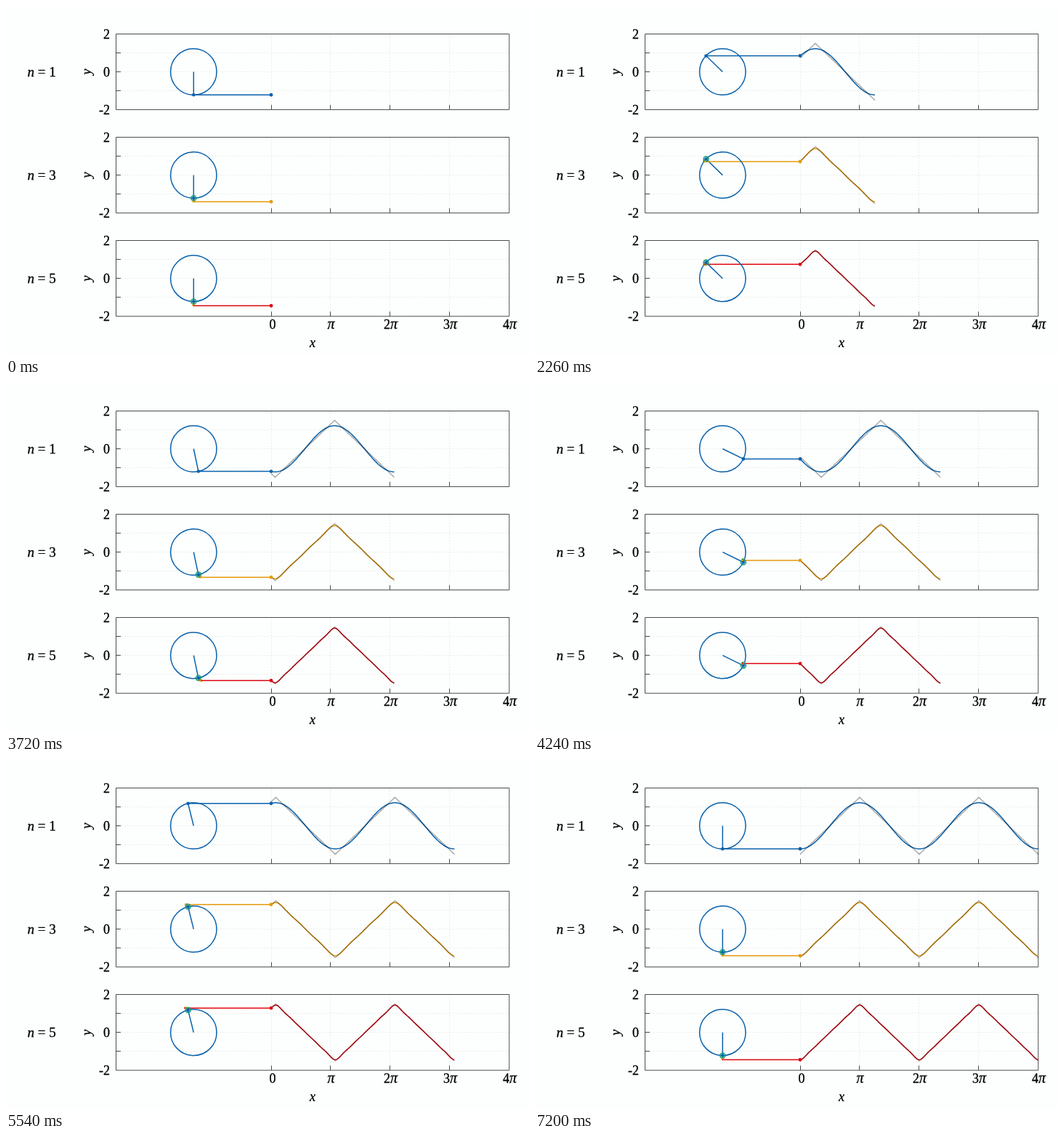
These frames come from a looping animation (720 px wide and 480 px high, 7.22 s). An HTML page:

```html
<!DOCTYPE html>
<html lang="en">
<head>
<meta charset="utf-8">
<title>Triangle wave from rotating circles</title>
<style>
  html, body { margin: 0; width: 100%; height: 100%; overflow: hidden; background: #fdfffe; }
  svg { display: block; width: 720px; height: 480px; }
  text { font: 18px "Liberation Serif", "Times New Roman", serif; fill: #000; stroke: #000; stroke-width: .3px; }
  .i { font-style: italic; }
  .pi { font-style: italic; font-size: 20px; }
  .name { font-size: 19px; }
  .mid { text-anchor: middle; }
  .end { text-anchor: end; }
  path, circle { fill: none; }
  .frame { stroke: #4a4a4a; stroke-width: 1; }
  .grid { stroke: #d3dbd8; stroke-width: 1; stroke-dasharray: 1 3; }
</style>
</head>
<body>
<svg viewBox="0 0 720 480"><g id="axes"></g><g id="motion"></g></svg>
<script>
const LEFT = 151.5, RIGHT = 692.8, ORIGIN = 365, HUB = 258.3, UNIT = 26.1;
const CENTERS = [90.5, 232.6, 374.7];
const COLORS = ['#0a62ad', '#109e78', '#e59a0c', '#e5c62c', '#e00b14'];
const AMP = 12 / Math.PI ** 2;
const STEP = 20, LOOP = 7220, SPAN = 7200;

const text = (x, y, cls, s) => `<text x="${x}" y="${y}" class="${cls}">${s}</text>`;
const path = (d, cls) => `<path class="${cls}" d="${d}"/>`;
const stroke = (d, color, extra = '') =>
  `<path d="${d}" stroke="${color}" stroke-width="1.5" stroke-linejoin="round" ${extra}/>`;
const ring = (x, y, r, color) =>
  `<circle cx="${x}" cy="${y}" r="${r}" stroke="${color}" stroke-width="1.5"/>`;
const dot = (x, y, r, color) => `<circle cx="${x}" cy="${y}" r="${r}" style="fill:${color}"/>`;

function axes() {
  let out = '';
  CENTERS.forEach((cy, i) => {
    const top = Math.floor(cy - 2 * UNIT + .1) + .5, bottom = cy + 52.1;
    let grid = '', ticks = `M${LEFT} ${top}H${RIGHT}V${bottom}H${LEFT}Z`;
    for (const v of [-1, 0, 1]) {
      const y = Math.floor(cy - v * UNIT) + .5;
      grid += `M${LEFT} ${y}H${RIGHT}`;
      ticks += `M${LEFT} ${y}h6.5`;
    }
    for (let k = 0; k < 4; k++) {
      const x = Math.floor(ORIGIN + k * Math.PI * UNIT) + .5;
      grid += `M${x} ${top}V${bottom}`;
      ticks += `M${x} ${bottom}v-6.5`;
    }
    out += path(grid, 'grid') + path(ticks, 'frame');
    for (const v of [2, 0, -2]) out += text(143, cy - v * UNIT + 6.5, 'end', v);
    out += `<text class="i mid" transform="translate(116.5 ${cy}) rotate(-90)">y</text>`;
    out += text(29.5, cy + 6, 'name', `<tspan class="i">n</tspan> = ${2 * i + 1}`);
  });
  for (let k = 0; k < 5; k++) {
    const label = k ? `${k > 1 ? k : ''}<tspan class="pi">π</tspan>` : '0';
    out += text(ORIGIN + k * Math.PI * UNIT + (k ? .5 : 2), 444, 'mid', label);
  }
  return out + text(422, 469, 'i mid', 'x');
}

// Fourier sum of the first odd harmonics
function wave(t, terms) {
  let y = 0;
  for (let n = 1; n < 2 * terms; n += 2) y -= AMP * Math.cos(n * t) / n ** 2;
  return y;
}
const triangle = t => 1.5 * (2 / Math.PI * Math.acos(Math.cos(t)) - 1);

// Newest value sits at x = 0, the first one at x = t
function trace(f, t, cy) {
  const pts = [];
  const add = u => pts.push(`${(ORIGIN + (t - u) * UNIT).toFixed(2)} ${(cy - f(u) * UNIT).toFixed(2)}`);
  for (let u = 0; u < t; u += Math.PI / 60) add(u);
  add(t);
  return 'M' + pts.join('L');
}

function panel(cy, terms, t) {
  const color = COLORS[terms - 1];
  let x = HUB, y = cy, arms = '', rings = '', joints = '';
  for (let k = 0; k < terms; k++) {
    const n = 2 * k + 1, r = AMP * UNIT / n ** 2;
    rings += ring(x, y, r, COLORS[k]);
    const from = `M${x} ${y}`;
    x += r * Math.sin(n * t);
    y += r * Math.cos(n * t);
    arms += stroke(`${from}L${x} ${y}`, COLORS[k]);
    joints += dot(x, y, k ? 2.3 / Math.sqrt(k + 1) : 2.3, COLORS[k]);
  }
  let out = arms + stroke(`M${x} ${y}H${ORIGIN}`, color);
  if (t) {
    out += stroke(trace(u => wave(u, terms), t, cy), color);
    out += stroke(trace(triangle, t, cy), '#000', 'stroke-opacity=".33"');
  }
  return out + rings + joints + dot(ORIGIN, y, 2.4, color);
}

const motion = document.getElementById('motion');
document.getElementById('axes').innerHTML = axes();

const start = performance.now();
function draw() {
  const ms = Math.floor((performance.now() - start) % LOOP / STEP) * STEP;
  const t = ms / SPAN * 4 * Math.PI;
  motion.innerHTML = CENTERS.map((cy, i) => panel(cy, 2 * i + 1, t)).join('');
  requestAnimationFrame(draw);
}
draw();
</script>
</body>
</html>
```
